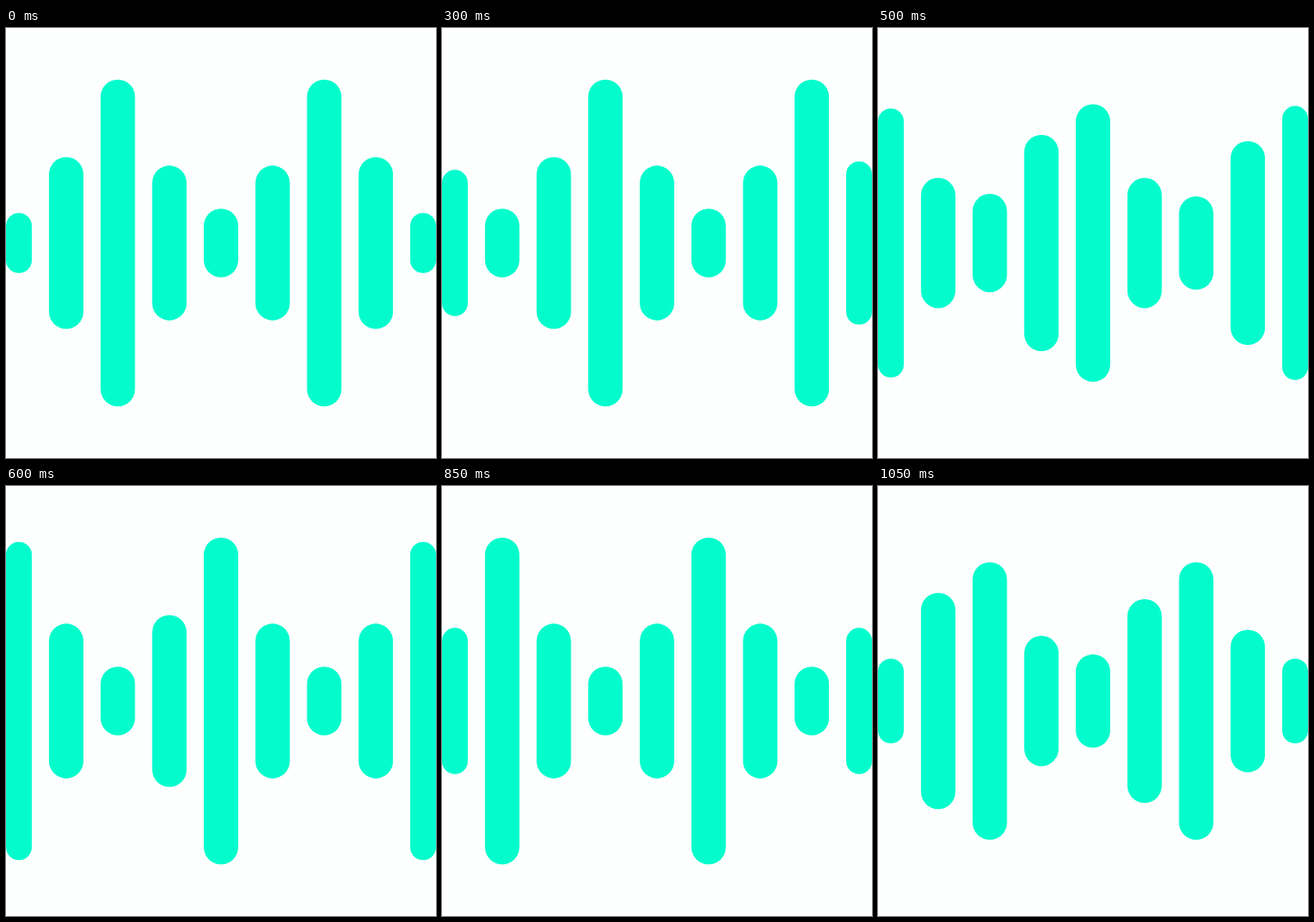
Recreate the animation shown at these times as an HTML page. Size 498x498 px, loop 1.1 s.

```html
<!DOCTYPE html>
<html lang="en">
<head>
<meta charset="utf-8">
<title>Sound wave</title>
<style>
  html, body { margin: 0; width: 100%; height: 100%; overflow: hidden; background: #fdfefe; }
  svg { display: block; width: 100vw; height: 100vh; }
  line { stroke: #04fccd; stroke-linecap: round; }
  g { filter: blur(.45px); }
</style>
</head>
<body>
<svg viewBox="0 0 500 500"><g id="wave"></g></svg>
<script>
  const LOOP = 1100, TICK = 50, POSES = 4, STEPS = 7;
  const COUNT = 9, PITCH = 60, MIDDLE = 250;
  const PEAK = 170, SHOULDER = 70, VALLEY = 20, SWELL = 10;

  const mod = (n, m) => ((n % m) + m) % m;

  // A crest every four bars moves one bar to the right per pose.
  // Half lengths leave out the round caps.
  function halfLength(bar, pose) {
    const p = pose % POSES;
    const shift = bar - p;
    const phase = mod(shift - 2, POSES);
    if (phase === 0) return PEAK;
    if (phase === 2) return VALLEY;
    // The outer shoulders swell a little until the last pose.
    const swells = shift % 6 === 1 && p < POSES - 1;
    return SHOULDER + (swells ? SWELL : 0);
  }

  // The outer bars are narrower and touch the edges of the stage.
  const wave = document.getElementById('wave');
  const lines = Array.from({ length: COUNT }, (_, i) => {
    const side = Math.sign(i - (COUNT - 1) / 2);
    const edge = i === 0 || i === COUNT - 1;
    const x = 10 + i * PITCH - (edge ? side * 5 : 0);
    const line = document.createElementNS('http://www.w3.org/2000/svg', 'line');
    line.setAttribute('x1', x);
    line.setAttribute('x2', x);
    line.setAttribute('stroke-width', edge ? 30 : 40);
    return wave.appendChild(line);
  });

  function draw(time) {
    const tick = Math.floor((time % LOOP) / TICK);
    // The wave advances in 40 ms steps, shown on a 50 ms clock.
    const step = Math.max(0, Math.ceil(tick * 1.25) - 1);
    const pose = Math.floor(step / STEPS);
    const mix = (step % STEPS) / STEPS;
    lines.forEach((line, i) => {
      const from = halfLength(i, pose), to = halfLength(i, pose + 1);
      const half = from + (to - from) * mix;
      line.setAttribute('y1', MIDDLE - half);
      line.setAttribute('y2', MIDDLE + half);
    });
  }

  const start = performance.now();

  function frame() {
    draw(performance.now() - start);
    requestAnimationFrame(frame);
  }

  frame();
</script>
</body>
</html>
```
